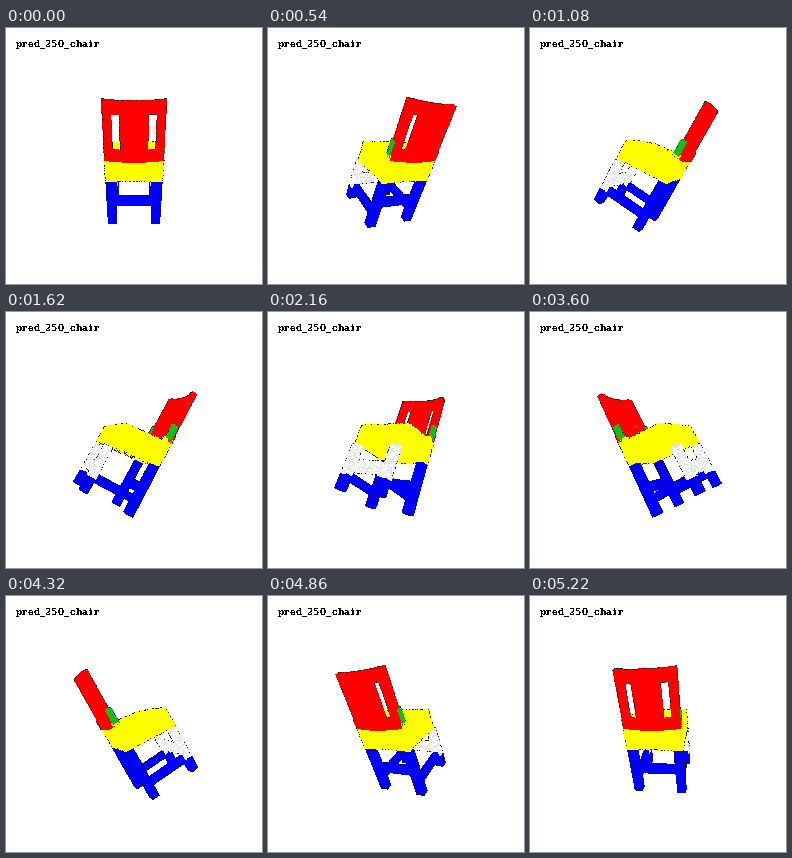
These frames come from a looping animation (256x256 px, 5.4 s). A matplotlib script:

```python
import numpy as np
import matplotlib.pyplot as plt
from matplotlib.animation import FuncAnimation

SIZE, FRAMES, STEP_MS = 256, 30, 180
CAMERA = 280.0
TILT = np.radians(30)
FOOT_U, FOOT_V = -9.8, -69.5      # bottom of the rear legs

RED, YELLOW, BLUE = (255, 0, 0), (255, 255, 0), (0, 0, 255)
GREEN, WHITE = (20, 190, 20), (254, 254, 254)

plt.rcParams["text.antialiased"] = False

points, colors = [], []


def shell(size, step=0.5):
    """Points on the faces of a unit cube, spaced for a box of this size."""
    axes = [np.linspace(0, 1, int(np.ceil(s / step)) + 1) for s in size]
    faces = []
    for k in range(3):
        for end in (0.0, 1.0):
            grid = list(axes)
            grid[k] = np.array([end])
            faces.append(np.stack(np.meshgrid(*grid), -1).reshape(-1, 3))
    return np.concatenate(faces)


def add(a, b, w, color):
    points.append(np.stack([a, b, w], 1))
    colors.append(np.tile(np.array(color, np.uint8), (len(a), 1)))


def box(a, b, w, color, bow=0.0):
    """Box with ranges along the chair's height, depth and width."""
    lo = np.array([a[0], b[0], w[0]], float)
    size = np.array([a[1], b[1], w[1]]) - lo
    pa, pb, pw = (lo + shell(size) * size).T
    add(pa, pb - bow * (1 - (pw / 26.5) ** 2), pw, color)


def pair(a, b, w, color, bow=0.0):
    box(a, b, w, color, bow)
    box(a, b, (-w[1], -w[0]), color, bow)


def seat():
    p, q, r = shell((24, 55, 54)).T
    b = 55 * q
    low = 52 - 5 * q
    top = 76 - 7 * q - 5 * np.clip((b - 46) / 9, 0, 1) ** 2
    half = 27 - 4 * np.clip((b - 46) / 9, 0, 1) ** 2
    add(low + p * (top - low), b, half * (2 * r - 1), YELLOW)


def build():
    # legs and stretchers
    pair((0, 52), (0, 7), (18.5, 26.5), BLUE)
    pair((0, 14), (47, 54), (18.5, 26.5), BLUE)
    pair((14, 45), (47, 54), (19, 26.5), WHITE)
    pair((11, 18), (6, 47), (20, 25), BLUE)
    box((22, 31), (2, 6), (-20, 20), BLUE)
    box((18, 29), (48, 53), (-20, 20), WHITE)
    # seat
    seat()
    pair((52, 80), (0, 7.5), (19, 26.5), YELLOW)
    # back
    pair((78, 131), (0.4, 5.5), (19.5, 26.3), RED, 2)
    box((120, 131), (1, 5), (-26.3, 26.3), RED, 3.5)
    box((76, 85), (-0.4, 5), (-26.5, 26.5), RED, 3.5)
    for k in range(-2, 3):
        box((83, 122), (1, 5), (5 * k - 2, 5 * k + 2), RED, 3.5)
    pair((79, 93), (2, 7.5), (24.5, 26.8), GREEN)


build()
A, B, W = np.concatenate(points).T
COLOR = np.concatenate(colors)
U = FOOT_U + A * np.sin(TILT) - B * np.cos(TILT)
V = FOOT_V + A * np.cos(TILT) + B * np.sin(TILT)


def render(i):
    t = 2 * np.pi * i / FRAMES
    z = U * np.cos(t) - W * np.sin(t)
    scale = CAMERA / (CAMERA - z)
    x = (SIZE / 2 + (U * np.sin(t) + W * np.cos(t)) * scale).astype(int)
    y = (SIZE / 2 - V * scale).astype(int)

    order = np.argsort(z, kind="stable")
    x, y = x[order], y[order]
    img = np.full((SIZE, SIZE, 3), 255, np.uint8)
    depth = np.full((SIZE, SIZE), -999.0)
    img[y, x] = COLOR[order]
    depth[y, x] = z[order]

    rng = np.random.default_rng(100 + i)
    noise = rng.random((SIZE, SIZE))
    # faint grain on the white parts
    pale = (img == WHITE[0]).all(axis=2)
    img[pale & (noise > 0.7)] = 222

    # speckled dark rim wherever the surface drops away
    rim = np.zeros((SIZE, SIZE), bool)
    for axis in (0, 1):
        for shift in (-1, 1):
            rim |= depth - np.roll(depth, shift, axis) > 11
    img[rim & (noise < 0.38)] = 25
    return img


def label(text, x, baseline, cell=6):
    for k, char in enumerate(text):
        ax.text(x + cell * (k + 0.5), baseline, char, family="DejaVu Serif",
                weight="bold", size=9, va="baseline", ha="center")


fig = plt.figure(figsize=(SIZE / 72, SIZE / 72), dpi=72, facecolor="white")
ax = fig.add_axes([0, 0, 1, 1])
ax.axis("off")
view = ax.imshow(render(0), interpolation="nearest",
                 extent=(0, SIZE, SIZE, 0), aspect="auto")
ax.set(xlim=(0, SIZE), ylim=(SIZE, 0))
label("pred_250_chair", 9.5, 19)


def update(i):
    view.set_data(render(i))
    return (view,)


anim = FuncAnimation(fig, update, frames=FRAMES, interval=STEP_MS,
                     repeat=True, repeat_delay=0, blit=False)
plt.show()
```
